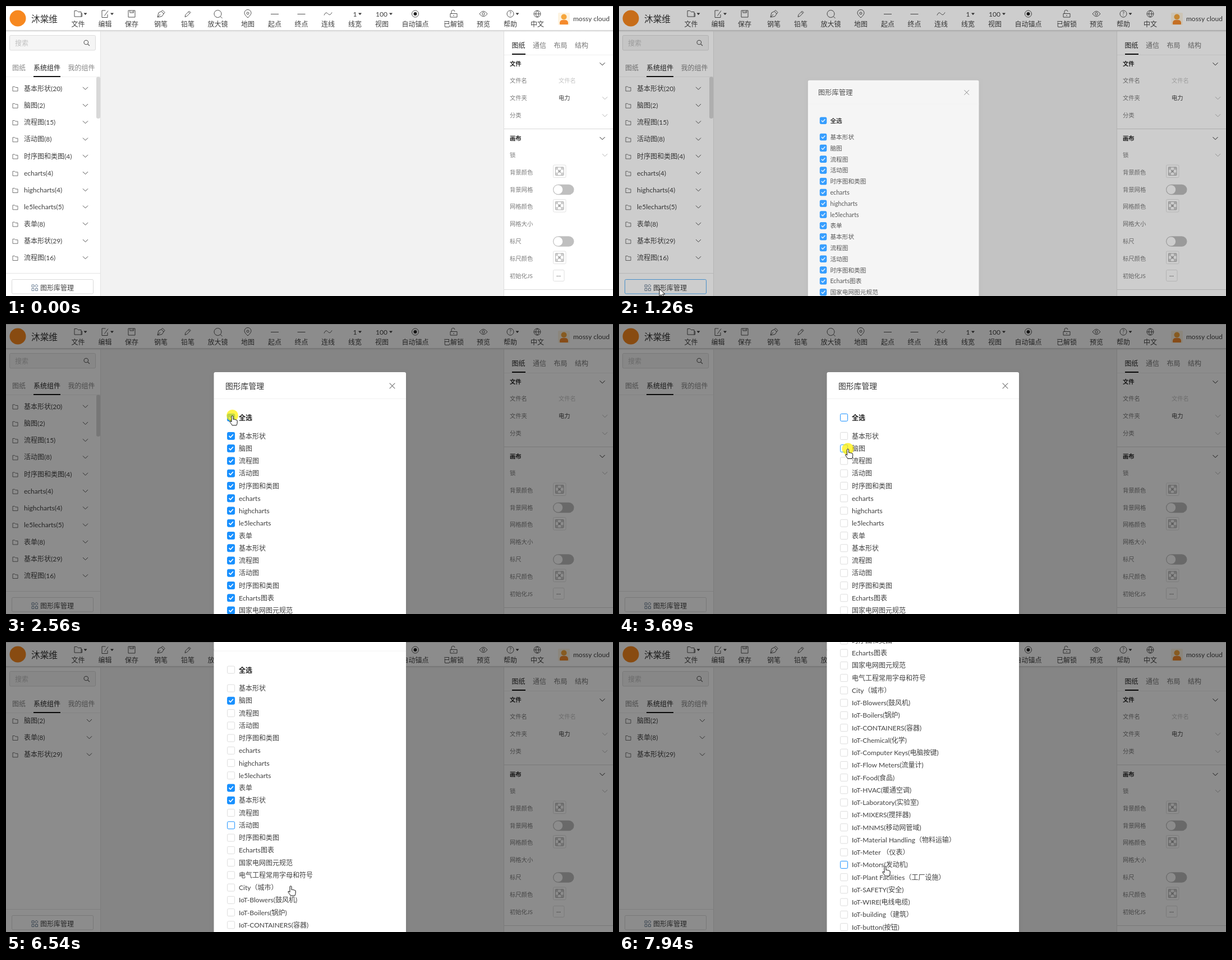
An HTML page with a canvas for the animation above (8 s loop, 1082x518 px).

```html
<!DOCTYPE html>
<html lang="zh-CN">
<head>
<meta charset="utf-8">
<title>图形库管理</title>
<style>
html, body { margin: 0; width: 100%; height: 100%; overflow: hidden; background: #f2f2f2; }
canvas { display: block; }
</style>
</head>
<body>
<canvas id="stage" width="1082" height="518"></canvas>
<script>
const W = 1082, H = 518, LOOP = 8000;
const g = document.getElementById('stage').getContext('2d');
const FONT = 'Lato, "Noto Sans CJK SC", "Noto Sans CJK", sans-serif';
const BLUE = '#1890ff';

// Screen updates come in bursts: [first, last, count].
const BURSTS = [[70, 240, 3], [470, 790, 5], [940, 940, 1], [1170, 1950, 11], [2030, 2560, 8],
  [2730, 3510, 11], [3690, 3740, 2], [3890, 4660, 11], [4750, 4830, 2], [4980, 5440, 7],
  [5690, 6150, 7], [6300, 7100, 11], [7180, 7940, 11]];

// Pointer path: time, x, y.
const PATH = [[70, 683, 504], [155, 213, 502], [240, 120, 530], [400, 110, 530], [470, 100, 513],
  [790, 72, 505], [1500, 72, 505], [1950, 404, 231], [2030, 403, 229], [2400, 403.5, 163.5],
  [2800, 403.5, 163.5], [3510, 408, 223], [3960, 408, 223], [4300, 411, 402], [4660, 403.5, 375.5],
  [5050, 403.5, 375.5], [5440, 407.5, 419], [5680, 407.5, 419], [5997, 406, 401.5],
  [6300, 406, 401.5], [6420, 438, 440], [6445, 442, 440], [6530, 507.5, 435.5],
  [7100, 507.5, 435.5], [7850, 474.5, 400.5]];

const CLICKS = [[940, 1170], [2480, 2730], [3690, 3890], [4750, 4980], [6070, 6300]];
const NOTCHES = [6450, 6850, 7180, 7500];

const LABELS = ['基本形状', '脑图', '流程图', '活动图', '时序图和类图', 'echarts', 'highcharts', 'le5lecharts',
  '表单', '基本形状', '流程图', '活动图', '时序图和类图', 'Echarts图表', '国家电网图元规范',
  '电气工程常用字母和符号', 'City（城市）', 'IoT-Blowers(鼓风机)', 'IoT-Boilers(锅炉)', 'IoT-CONTAINERS(容器)',
  'IoT-Chemical(化学)', 'IoT-Computer Keys(电脑按键)', 'IoT-Flow Meters(流量计)', 'IoT-Food(食品)',
  'IoT-HVAC(暖通空调)', 'IoT-Laboratory(实验室)', 'IoT-MIXERS(搅拌器)', 'IoT-MNMS(移动网管域)',
  'IoT-Material Handling（物料运输）', 'IoT-Meter （仪表）', 'IoT-Motors(发动机)',
  'IoT-Plant Facilities（工厂设施）', 'IoT-SAFETY(安全)', 'IoT-WIRE(电线电缆)', 'IoT-building（建筑）',
  'IoT-button(按钮)'];
const COUNTS = [20, 2, 15, 8, 4, 4, 4, 5, 8, 29, 16];
const PICKED = { 1: 3890, 8: 4980, 9: 6300 };

const clamp = v => Math.max(0, Math.min(1, v));
const smooth = v => { v = clamp(v); return v * v * (3 - 2 * v); };
const rowY = i => 200 + 22.25 * i;

function snap(t) {
  let last = 0;
  for (const [a, b, n] of BURSTS) {
    if (t < a) break;
    const step = n > 1 ? (b - a) / (n - 1) : 1;
    last = a + Math.min(n - 1, Math.floor((t - a) / step + 0.01)) * step;
  }
  return last;
}

function pointer(t) {
  let i = 0;
  while (i < PATH.length - 2 && t >= PATH[i + 1][0]) i++;
  const [t0, x0, y0] = PATH[i], [t1, x1, y1] = PATH[i + 1];
  const k = smooth((t - t0) / (t1 - t0));
  return [x0 + (x1 - x0) * k, y0 + (y1 - y0) * k];
}

const scrollAt = t => NOTCHES.reduce((s, n) => s + 117.4 * smooth((t - n) / 90), 0);

// cubic-bezier(.08, .82, .17, 1)
function easeOutCirc(x) {
  if (x <= 0) return 0;
  if (x >= 1) return 1;
  let lo = 0, hi = 1;
  const curve = (s, a, b) => 3 * a * s * (1 - s) ** 2 + 3 * b * s * s * (1 - s) + s ** 3;
  for (let i = 0; i < 24; i++) {
    const mid = (lo + hi) / 2;
    if (curve(mid, 0.08, 0.17) < x) lo = mid; else hi = mid;
  }
  return curve(lo, 0.82, 1);
}

function text(s, x, y, color = '#404040', size = 12, weight = 400, align = 'left') {
  g.font = `${weight} ${size}px ${FONT}`;
  g.textAlign = align;
  g.fillStyle = color;
  g.fillText(s, x, y + size * 0.38);
}
function rect(x, y, w, h, color) {
  g.fillStyle = color;
  g.fillRect(x, y, w, h);
}
function box(x, y, w, h, r, fill, line) {
  g.beginPath();
  g.roundRect(x, y, w, h, r);
  if (fill) { g.fillStyle = fill; g.fill(); }
  if (line) { g.strokeStyle = line; g.lineWidth = 1; g.stroke(); }
}
function disc(x, y, r, color) {
  g.beginPath();
  g.arc(x, y, r, 0, 7);
  g.fillStyle = color;
  g.fill();
}
function icon(x, y, d, line = '#505050', width = 1, fill) {
  const p = new Path2D(d);
  g.save();
  g.translate(x, y);
  if (fill) { g.fillStyle = fill; g.fill(p); }
  g.strokeStyle = line;
  g.lineWidth = width;
  g.lineJoin = 'round';
  g.stroke(p);
  g.restore();
}
const chevron = (x, y, color = '#505050') => icon(x, y, 'M-4.5-2.2L0 2.3L4.5-2.2', color);
const ring = r => `M${-r} 0A${r} ${r} 0 1 1 ${r} 0A${r} ${r} 0 1 1 ${-r} 0Z`;

// Label, centre, outline, caret position.
const TOOLS = [
  ['文件', 128.5, 'M-6.5-5.5H-2L0-3.5H5.5V5H-6.5ZM5.5-1H7V5H5', 141.5],
  ['编辑', 176.5, 'M1-6H-5.5V6.5H4.5V1M5.5-5.5L-1 3.5', 189],
  ['保存', 224, 'M-6-6H6V6H-6ZM-3-6V-2H3.5V-6M1-5V-3'],
  ['钢笔', 276, 'M-6 6L-4-2L1-4.5L5 0L2 4.5ZM1-4.5L3-6.5L7-2.5L5 0M-6 6L-1 1'],
  ['铅笔', 324, 'M-5 5.5L-4 1.5L2.5-5L5-2.5L-1.5 4.2ZM1-3.5L3.5-1'],
  ['放大镜', 377.5, ring(6.5) + 'M4.7 4.7L8 8'],
  ['地图', 431, 'M0 7Q-6 1.5-6-1.5A6 6 0 0 1 6-1.5Q6 1.5 0 7ZM-2-1A2 2 0 1 1 2-1A2 2 0 1 1-2-1Z'],
  ['起点', 479, 'M-7 .5H7'],
  ['终点', 526.5, 'M-7 .5H7'],
  ['连线', 574, 'M-7 2.5C-4-4-2-2 0 0S4 3 7-2.5'],
  ['线宽', 622, '', 631],
  ['视图', 670, '', 686],
  ['自动锚点', 729.5, ring(6)],
  ['已解锁', 798, 'M-6-.5H6V6H-6ZM-4-.5V-3.5A3 3 0 0 1 2-4M0 2V4'],
  ['预览', 851, 'M-7 0Q0-9.5 7 0Q0 9.5-7 0ZM-2.3 0A2.3 2.3 0 1 1 2.3 0A2.3 2.3 0 1 1-2.3 0Z'],
  ['帮助', 899, ring(6), 911.5],
  ['中文', 947, ring(6) + 'M-6 0H6M0-6Q-5.5 0 0 6Q5.5 0 0-6']
];

function topBar() {
  const shade = g.createLinearGradient(0, 43, 0, 47);
  shade.addColorStop(0, '#cfcfcf');
  shade.addColorStop(1, 'rgba(220,220,220,0)');
  rect(0, 43, W, 4, shade);
  rect(0, 0, W, 43, '#fff');
  rect(0, 0, W, 1, '#d4d4d4');
  disc(21, 22, 14.5, '#f7881f');
  text('沐棠维', 45, 23, '#333', 15.7);
  for (const [name, x, d, caret] of TOOLS) {
    text(name, x, 32.3, '#404040', 12, 400, 'center');
    icon(x, 14, d);
    if (caret) icon(caret, 14, 'M-2.5-1.2H2.5L0 1.8Z', '#333', 0.5, '#333');
  }
  text('1', 622, 14.5, '#404040', 12, 400, 'center');
  text('100', 669.5, 14.5, '#404040', 12, 400, 'center');
  text('?', 899, 14, '#505050', 9, 400, 'center');
  disc(729.5, 14, 3, '#222');
  box(984, 12, 21, 22, 2, '#fdf3e1');
  disc(994.5, 19.5, 5, '#f6a63c');
  box(987, 25, 15, 8, [5, 5, 1, 1], '#f58a2c');
  text('mossy cloud', 1011, 22.5);
}

function sideRow(label, y, chevX) {
  icon(16.5, y + 1, 'M-4.5-4H-1L.5-2.5H4.5V4H-4.5Z', '#666', 0.9);
  text(label, 32, y);
  chevron(chevX, y);
}

function leftPanel(t) {
  rect(0, 45, 168, H, '#fff');
  rect(168, 45, 1, H, '#e2e2e2');
  box(6.5, 52.5, 153, 26.5, 2, '#f5f5f5', '#dcdcdc');
  text('搜索', 16, 66.5, '#bfbfbf');
  icon(142.8, 65, ring(3.8) + 'M2.8 2.8L6.2 6', '#555', 1.1);
  text('图纸', 11, 110, '#858585');
  text('系统组件', 49, 110, '#222');
  text('我的组件', 110.5, 110, '#858585');
  rect(0, 126, 168, 1, '#f0f0f0');
  rect(49, 125, 48, 2, '#111');

  const name = i => `${LABELS[i]}(${COUNTS[i]})`;
  if (t < 2880) {
    COUNTS.forEach((_, i) => sideRow(name(i), 147 + 30.25 * i, 141.5));
    box(161, 126.5, 7, 74.5, 3, '#d8d8d8');
  } else {
    Object.keys(PICKED).filter(i => t >= PICKED[i] + 70)
      .forEach((i, n) => sideRow(name(i), 140.2 + 30.3 * n, 148.5));
  }

  rect(0, 477, 168, 1, '#e4e4e4');
  const hot = t >= 470 && t < 1320;
  box(10.5, 488.5, 145, 25.5, 2, '#fff', hot ? '#58b2fa' : '#d9d9d9');
  icon(51, 503, 'M-5-5H-1V-1H-5ZM-5 1.5H-1V5.5H-5ZM1.5 1.5H5.5V5.5H1.5ZM3.3-6L6-3L3.3-.2L.6-3Z', '#6c8096');
  text('图形库管理', 61, 503.3);
}

function swatch(y) {
  box(975.5, y - 11.5, 22.5, 22.5, 2, '#fff', '#e2e2e2');
  for (let i = 0; i < 9; i += 2) rect(979 + (i % 3) * 5, y - 8 + Math.floor(i / 3) * 5, 5, 5, '#d0d0d0');
  box(979.5, y - 7.5, 14.5, 14.5, 1, null, '#b0b0b0');
  icon(986.5, y, 'M-2.2-2.2L2.2 2.2M2.2-2.2L-2.2 2.2', '#888');
}
function toggle(y) {
  box(975, y - 9.3, 37.5, 18.6, 9.3, '#bfbfbf');
  disc(984.2, y, 8, '#fff');
}

function rightPanel() {
  rect(888, 45, 194, H, '#fff');
  rect(887, 45, 1, H, '#dedede');
  ['图纸', '通信', '布局', '结构'].forEach((s, i) => text(s, 901.5 + 37.5 * i, 70.3, i ? '#777' : '#222'));
  rect(888, 87, 194, 1, '#efefef');
  rect(902, 85, 24, 2, '#111');
  const heads = [['文件', 103.5], ['画布', 236.3]];
  for (const [s, y] of heads) {
    text(s, 898, y, '#222', 10.3, 700);
    chevron(1063, y, '#222');
  }
  const rows = [['文件名', 133], ['文件夹', 164], ['分类', 195], ['锁', 266], ['背景颜色', 297], ['背景网格', 328],
    ['网格颜色', 358.5], ['网格大小', 389.5], ['标尺', 420.5], ['标尺颜色', 451], ['初始化JS', 482]];
  for (const [s, y] of rows) text(s, 898, y, '#7c7c7c', 10.3);
  text('文件名', 985, 133, '#c4c4c4', 10.3);
  text('电力', 985, 164, '#404040', 10.3);
  [164.5, 195.5, 266.3].forEach(y => chevron(1067.5, y, '#b4b4b4'));
  rect(888, 219, 194, 1, '#d9d9d9');
  rect(888, 506, 194, 1, '#d9d9d9');
  [295.5, 357, 449.5].forEach(swatch);
  [328, 420.5].forEach(toggle);
  box(975.5, 471.5, 19.5, 20, 2, '#fff', '#e0e0e0');
  for (let i = -1; i < 2; i++) disc(985 + i * 2.6, 482.5, 0.7, '#555');
}

function checkbox(y, on, hot) {
  box(394.6, y - 6.5, 13, 13, 2, on ? BLUE : '#fff', on || hot ? BLUE : '#dcdcdc');
  if (on) icon(401.1, y, 'M-3.6-.2L-1 2.6L3.8-2.8', '#fff', 1.7);
}

function hovered(t) {
  if (t < 1950) return -1;
  const [x, y] = pointer(t);
  const row = (y + scrollAt(t) - rowY(0)) / 22.25, i = Math.round(row);
  g.font = `400 12px ${FONT}`;
  const inside = LABELS[i] && x < 417 + g.measureText(LABELS[i]).width;
  return inside && Math.abs(row - i) < 0.45 ? i : -1;
}

function modal(t) {
  const p = easeOutCirc((t - 1160) / 315);
  if (!p) return;
  rect(0, 0, W, H, `rgba(0,0,0,${0.45 * clamp((t - 1160) / 200)})`);
  const hot = hovered(t - 100), k = 0.2 + 0.8 * p;
  g.save();
  g.globalAlpha = p;
  g.translate(66, 508);
  g.scale(k, k);
  g.translate(-66, -508 - scrollAt(t));
  g.shadowColor = 'rgba(0,0,0,.06)';
  g.shadowBlur = 6;
  g.shadowOffsetY = 2;
  box(370.5, 86, 342.5, 1200, 3, '#fff');
  g.shadowColor = 'transparent';
  text('图形库管理', 391, 110.3, '#333', 13.8);
  icon(688.5, 110.5, 'M-4.8-4.8L4.8 4.8M4.8-4.8L-4.8 4.8', '#777', 1.1);
  rect(371, 133, 342, 1, '#f2f2f2');
  const all = t < 2730;
  checkbox(167, all, t < 3740);
  text('全选', 415, 167.5, '#222', 12, 700);
  LABELS.forEach((s, i) => {
    checkbox(rowY(i), all || t >= PICKED[i], i === hot);
    text(s, 415, rowY(i));
  });
  g.restore();
}

const ARROW = 'M0 0V13.5L3.2 10.6L5.6 16.2L8 15.2L5.6 9.8H10Z';
const HAND = 'M-1.5 1.2Q0-.8 1.5 1.2V7Q3 6 4.2 7.3Q5.6 6.6 6.8 8Q8.6 7.6 8.7 9.5V12.5Q8.7 15 7.3 17.5H-.3' +
  'Q-1.2 15.5-4 12.2Q-5.5 9.6-3.4 9.7L-1.5 11.4Z';

function cursor(t) {
  if (t < 70) return;
  const [x, y] = pointer(t);
  if (CLICKS.some(([a, b]) => t >= a && t < b)) disc(x, y, 10.5, 'rgba(255,240,0,.72)');
  const arrow = t < 400 || (t >= 1170 && t < 1900);
  icon(x, y, arrow ? ARROW : HAND, '#111', 1, '#fff');
}

function draw(now) {
  const t = snap(now % LOOP);
  rect(0, 0, W, H, '#f2f2f2');
  leftPanel(t);
  rightPanel();
  topBar();
  modal(t);
  cursor(t);
}

const start = performance.now();
function tick() {
  draw(performance.now() - start);
  requestAnimationFrame(tick);
}
tick();
</script>
</body>
</html>
```
